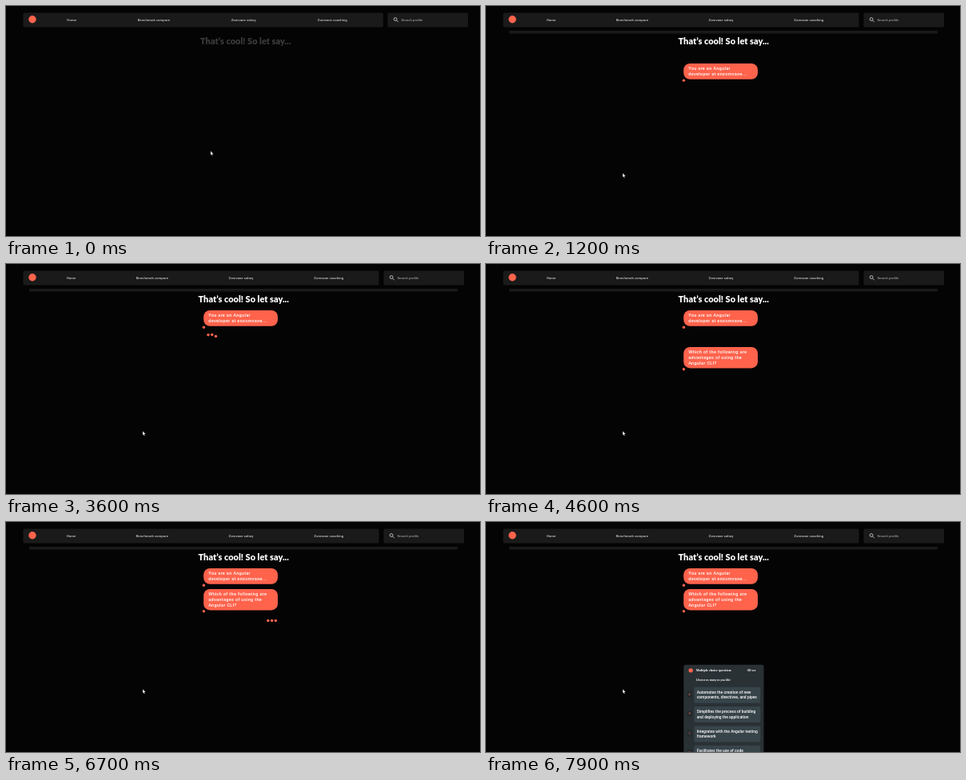
An HTML page for the animation above (8 s loop, 593x288 px).

```html
<!DOCTYPE html>
<html lang="en">
<head>
<meta charset="utf-8">
<title>Quiz chat</title>
<style>
  html, body { margin: 0; width: 100%; height: 100%; overflow: hidden; background: #040405; }
  svg { display: block; width: 100%; height: 100%; }
  text { font-family: Roboto, "Open Sans", sans-serif; fill: #fff; white-space: pre; }
  .panel { fill: #1a1a1a; }
  .nav { font-size: 4.35px; font-weight: 500; fill: #c6c6c6; text-anchor: middle; }
  .hint { font-size: 4.4px; fill: #b4b4b4; }
  .title { font: 900 11px Lato, Inter, sans-serif; text-anchor: middle; }
  .accent { fill: #ff634c; }
  .say { font-size: 5.6px; font-weight: 500; letter-spacing: .3px; }
  .head { font: bold 4.15px "Liberation Serif", serif; }
  .note { font: italic bold 3.8px "Liberation Serif", serif; }
  .option { font-size: 4.95px; font-weight: 500; }
  .key { font-size: 4px; font-weight: 500; fill: #b5524a; text-anchor: middle; }
</style>
</head>
<body>
<svg id="stage" viewBox="0 0 593 288" preserveAspectRatio="none">
  <rect width="593" height="288" fill="#040405"/>
  <rect id="navBar" class="panel" x="21.5" y="8.5" height="18" rx="1.5"/>
  <circle class="accent" cx="33" cy="16.8" r="4.7"/>
  <g id="navItems"></g>
  <g id="search">
    <rect class="panel" x="477.5" y="8.5" width="100.5" height="18" rx="1.5"/>
    <g fill="none" stroke="#dcdcdc" stroke-width=".8">
      <circle cx="487.1" cy="16.5" r="1.9"/>
      <path d="M488.5 17.9L490.8 20.2"/>
    </g>
    <text class="hint" x="494.5" y="18.9">Search profile</text>
  </g>
  <rect id="progress" class="panel" x="29" y="31" width="536" height="3.4" rx="1"/>
  <text id="title" class="title" y="48">That’s cool! So let say...</text>
  <g id="chat"></g>
  <g id="card"></g>
  <path id="cursor" d="M0 0V5.2L1.2 4.1L2 5.9L2.9 5.5L2.1 3.8H3.7Z" fill="#fff" stroke="#000" stroke-width=".3"/>
</svg>
<script>
const LOOP = 8000;
const WIDE_UNTIL = 960;
const SLIDE = 1000;
const $ = id => document.getElementById(id);
const set = (el, attrs) => { for (const k in attrs) el.setAttribute(k, attrs[k]); };
const show = (el, on) => set(el, { visibility: on ? "visible" : "hidden" });
const clamp = v => Math.min(1, Math.max(0, v));
const mix = (a, b, p) => a + (b - a) * p;

function add(parent, markup) {
  const g = document.createElementNS("http://www.w3.org/2000/svg", "g");
  g.innerHTML = markup;
  parent.appendChild(g);
  return g;
}

// cubic-bezier(.42, 0, .58, 1)
function easeInOut(x) {
  let lo = 0, hi = 1;
  for (let i = 0; i < 24; i++) {
    const s = (lo + hi) / 2, r = 1 - s;
    if (3 * r * r * s * .42 + 3 * r * s * s * .58 + s * s * s < x) lo = s; else hi = s;
  }
  return lo * lo * (3 - 2 * lo);
}

const navItems = [
  ["Home", 82.2, 81.5],
  ["Benchmark compare", 184.8, 182.8],
  ["Zomvane salary", 297.2, 294],
  ["Zomvane coaching", 408.3, 403.8]
].map(([label, wide, narrow]) => ({
  wide, narrow, el: add($("navItems"), `<text class="nav" y="18.7">${label}</text>`)
}));

function bubbleMarkup(lines) {
  const h = 6.6 * lines.length + 6.6;
  const rows = lines.map((s, i) => `<text class="say" x="253.2" y="${8.4 + 6.6 * i}">${s}</text>`);
  return `<rect class="accent" x="247.2" width="92.8" height="${h}" rx="8"/>
    <circle class="accent" cx="247.4" cy="${h + 1.4}" r="1.7"/>${rows.join("")}`;
}

const options = [
  ["Automates the creation of new", "components, directives, and pipes"],
  ["Simplifies the process of building", "and deploying the application"],
  ["Integrates with the Angular testing", "framework"],
  ["Facilitates the use of code", "generation tools"]
];

function cardMarkup() {
  const rows = options.map(([a, b], i) => {
    const y = 27.8 + 24.4 * i;
    return `<rect x="251.5" y="${y + 5}" width="6.5" height="8" rx="1" fill="#222a2e"/>
      <text class="key" x="254.7" y="${y + 10.3}">${"ABCD"[i]}</text>
      <rect x="260.5" y="${y}" width="82.8" height="20" rx="1.5" fill="#37444a"/>
      <text class="option" x="263.7" y="${y + 8.3}">${a}</text>
      <text class="option" x="263.7" y="${y + 14.7}">${b}</text>`;
  });
  return `<rect x="247.3" width="100.2" height="130" rx="2.5" fill="#293135"/>
    <circle class="accent" cx="256.2" cy="7" r="2.7"/>
    <text class="head" x="262.7" y="8.3">Multiple choice question:</text>
    <text class="head" x="327.2" y="8.3">60 sec</text>
    <text class="note" x="262.8" y="20.3">Choose as many as you like</text>${rows.join("")}`;
}

const sliders = [
  { el: add($("chat"), bubbleMarkup(["You are an Angular", "developer at enzomvane..."])), start: 980, from: 73.5, to: 58 },
  { el: add($("chat"), bubbleMarkup(["Which of the following are", "advantages of using the", "Angular CLI?"])), start: 4280, from: 109.5, to: 84 },
  { el: add($("card"), cardMarkup()), start: 7580, from: 195.5, to: 118 }
];

const typing = [
  { x: 253, y: 91.2, on: 1980, off: 3890, wave: 2170 },
  { x: 327.9, y: 123.5, on: 5290, off: 7200, wave: 5600 }
].map(d => ({
  ...d,
  el: add($("chat"), [0, 1, 2].map(i => `<circle class="accent" cx="${d.x + 4.75 * i}" r="1.75"/>`).join(""))
}));

// Each dot hops once per period, one after the other.
function hop(t) {
  if (t < 0) return 0;
  return 3 * Math.sin(Math.PI * clamp((t % 1100) / 520)) ** 2;
}

const cursorPath = [
  [0, 256, 181.5], [500, 217, 212], [800, 194, 219.5], [900, 188, 219],
  [1000, 180, 215.5], [1200, 171, 209.3]
];

function cursorAt(t) {
  const i = cursorPath.findIndex(p => p[0] > t);
  if (i < 0) return cursorPath.at(-1).slice(1);
  const a = cursorPath[i - 1], b = cursorPath[i];
  const p = (t - a[0]) / (b[0] - a[0]);
  return [mix(a[1], b[1], p), mix(a[2], b[2], p)];
}

function draw(t) {
  const wide = t < WIDE_UNTIL;
  set($("navBar"), { width: wide ? 450.3 : 445 });
  for (const n of navItems) set(n.el, { transform: `translate(${wide ? n.wide : n.narrow} 0)` });
  set($("search"), { transform: `translate(${wide ? 0 : -5} 0)` });
  show($("progress"), !wide);
  set($("title"), { x: wide ? 299.7 : 297.2, opacity: clamp(.22 + t / 1000) });

  for (const s of sliders) {
    const p = easeInOut(clamp((t - s.start) / SLIDE));
    show(s.el, t >= s.start);
    set(s.el, { transform: `translate(0 ${mix(s.from, s.to, p)})` });
  }
  for (const d of typing) {
    show(d.el, t >= d.on && t < d.off);
    [...d.el.children].forEach((c, i) => set(c, { cy: d.y - hop(t - d.wave - 120 * i) }));
  }
  set($("cursor"), { transform: `translate(${cursorAt(t).join(" ")})` });
}

const began = performance.now();
function tick() {
  draw((performance.now() - began) % LOOP);
  requestAnimationFrame(tick);
}
tick();
</script>
</body>
</html>
```
